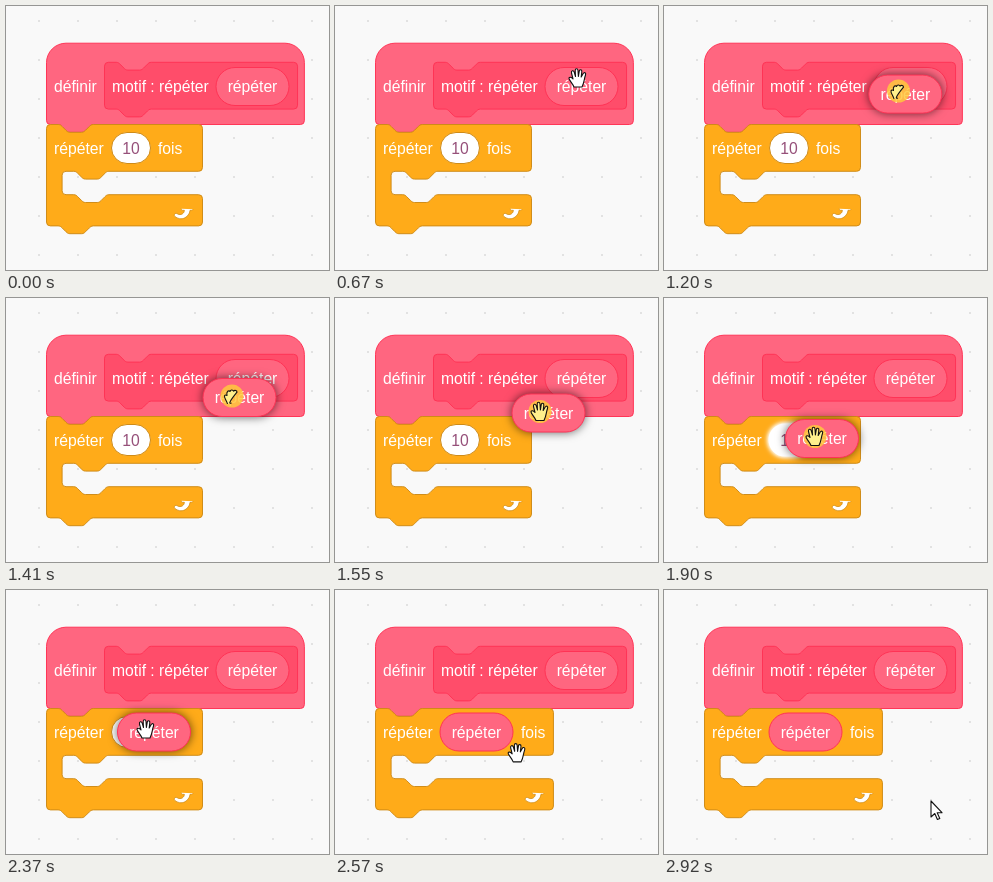
Write an HTML page that moves like this. It is 323x264 px and loops after 4110 ms.

```html
<!DOCTYPE html>
<html lang="fr">
<meta charset="utf-8">
<style>
html, body { margin: 0; width: 100%; height: 100%; overflow: hidden; background: #f9f9f9 }
svg { display: block; width: 323px; height: 264px }
text { font: 15.7px "Liberation Sans", Arial, sans-serif; fill: #fff }
.pink { fill: #ff6680; stroke: #ff3355 }
.rose { fill: #ff4d6a; stroke: #ff3355 }
.gold { fill: #ffab19; stroke: #cf8b17 }
.mid { text-anchor: middle }
#drag { filter: drop-shadow(0 0 5px rgba(0, 0, 0, .6)) }
#slot.glow { stroke: #fff; stroke-width: 2; filter: drop-shadow(0 0 2px #fff) drop-shadow(0 0 2px #fff) }
#cursor path { stroke: #111; stroke-width: 1.1; stroke-linejoin: round }
</style>
<body>
<script>
const LOOP = 4110, SCALE = .975;

// Connector notch drawn rightwards and leftwards
const R = 'c2 0 3 1 4 2l4 4c1 1 2 2 4 2h12c2 0 3-1 4-2l4-4c1-1 2-2 4-2';
const L = 'c-2 0-3 1-4 2l-4 4c-1 1-2 2-4 2h-12c-2 0-3-1-4-2l-4-4c-1-1-2-2-4-2';
const TOP = `M0 4a4 4 0 0 1 4-4h8${R}`;
const END = `a4 4 0 0 1-4 4H48${L}H4a4 4 0 0 1-4-4z`;

const hat = `M0 20a20 20 0 0 1 20-20h224.5a20 20 0 0 1 20 20v59.4${END}`;
const proto = `${TOP}H194a4 4 0 0 1 4 4v40${END}`;
const loopBlock = w => `${TOP}H${w - 4}a4 4 0 0 1 4 4v40a4 4 0 0 1-4 4H64${L}h-8` +
  `a4 4 0 0 0-4 4v16a4 4 0 0 0 4 4h8${R}H${w - 4}a4 4 0 0 1 4 4v24${END}`;
const turn = 'M23.3 11c-.3.6-.9 1-1.5 1h-1.6c-.1 1.3-.5 2.5-1.1 3.6-.9 1.7-2.3 3.2-4.1 4.1' +
  '-1.7.9-3.6 1.2-5.5.9-1.8-.3-3.5-1.1-4.9-2.3-.7-.7-.7-1.9 0-2.6.6-.6 1.6-.7 2.3-.2H7' +
  'c.9.6 1.9.9 2.9.9s1.9-.3 2.7-.9c1.1-.8 1.8-2.1 1.8-3.5h-1.5c-.9 0-1.7-.7-1.7-1.7' +
  '0-.4.2-.9.5-1.2l4.4-4.4c.7-.6 1.7-.6 2.4 0L23 9.2c.5.5.6 1.2.3 1.8z';

const shapes = {
  arrow: 'M0 0V16l3.8-3.5 2.6 6 2.4-1-2.6-5.8H11z',
  open: 'M-4 9C-5 6-9 2-9 .5-9-1.5-6.5-1-5 1L-6.5-5C-7-7.5-4.5-8-3.8-5.8L-2.5-1.5-2.8-7.5' +
    'C-2.8-9.8-.2-9.8 0-7.5L.4-1.5 1.3-7C1.7-9 4.1-8.5 3.8-6.3L3.2-1 5.2-4.5C6.3-6.3 8.3-5 7.5-3 6 1 6.5 4 4 9z',
  fist: 'M-4.5 8C-5 5-8 2-7.5 0-7-1.5-5.5-.8-5-.5-6-5-3-6-2-4.5-1.5-6.5 1-6.5 1.5-4.8 3-6.5 5-5 5-3.8' +
    '7-4.5 7.8-2.5 7.5-.5 7 4 6 4 5 8z'
};

const block = (x, y, d, cls, id = '') =>
  `<g transform="translate(${x} ${y}) scale(${SCALE})"><path id="${id}" class="${cls}" d="${d}"/></g>`;
const text = (x, y, s, extra = '') => `<text x="${x}" y="${y}" ${extra}>${s}</text>`;
const pill = (x, y, id = '') => `<g id="${id}" transform="translate(${x} ${y})">
  <rect class="pink" x="-36.5" y="-19" width="73" height="38" rx="19"/>${text(0, 5.6, 'répéter', 'class="mid"')}</g>`;

document.body.innerHTML = `<svg viewBox="0 0 323 264">
  <pattern id="grid" x="32" y="14" width="39" height="39" patternUnits="userSpaceOnUse">
    <rect width="2" height="2" fill="#e2e2e2"/></pattern>
  <rect width="323" height="264" fill="url(#grid)"/>
  ${block(40.5, 37.2, hat, 'pink')}
  ${block(98.5, 56.3, proto, 'rose')}
  ${text(48, 86, 'définir')}${text(106, 86, 'motif : répéter')}
  ${pill(246.5, 80.5)}
  ${block(40.5, 118.5, '', 'gold', 'loop')}
  ${text(48, 148, 'répéter')}${text(152, 148, 'fois', 'id="times"')}
  <g id="turn"><path d="${turn}" transform="scale(${SCALE})" fill="#fff" stroke="#cf8b17" stroke-width=".8"/></g>
  <g id="input"><rect id="slot" x="105.5" y="126.5" width="39" height="31" rx="15.5" fill="#fff" stroke="#cf8b17"/>
    ${text(125, 148, '10', 'class="mid" style="fill:#96507a"')}</g>
  ${pill(0, 0, 'drag')}
  ${pill(141.5, 142, 'placed')}
  <g id="cursor"><circle r="11.5" fill="#ffc93c" opacity=".85"/><path/></g>
</svg>`;

const $ = id => document.getElementById(id);
const show = (el, on) => el.setAttribute('visibility', on ? 'visible' : 'hidden');
const place = (el, [x, y]) => el.setAttribute('transform', `translate(${x} ${y})`);
const [halo, glyph] = $('cursor').children;

// Motion runs in short bursts of steps: start, end, step length
const bursts = [[0, 0, 1], [330, 670, 68], [930, 1410, 80], [1480, 1970, 70], [2370, 2850, 80], [2920, 2920, 1]];
function stepTime(t) {
  const [start, end, step] = bursts.filter(b => b[0] <= t).pop();
  return Math.min(end, start + Math.floor((t - start) / step) * step);
}

// Keys: time, x, y
const cursorPath = [[330, 295, 236], [670, 243, 72], [930, 243, 72], [1410, 226, 98], [1690, 184, 129],
  [1900, 151, 138.5], [1970, 140, 139], [2370, 140, 139], [2850, 266.5, 210.5], [2920, 267, 211]];
const dragPath = [[1010, 246.5, 80.5], [1410, 233.5, 99.5], [1690, 193.5, 130.5], [1900, 158, 140.5], [1970, 148, 142]];
function at(path, t) {
  const i = path.findIndex(k => k[0] > t);
  if (i < 1) return path.at(i).slice(1);
  const [a, b] = [path[i - 1], path[i]], p = (t - a[0]) / (b[0] - a[0]);
  return [1, 2].map(n => a[n] + (b[n] - a[n]) * p);
}

function draw(now) {
  const t = stepTime(now % LOOP);
  const snapped = t >= 2450, pressed = t >= 930 && t < 2370, width = snapped ? 182.5 : 160;
  $('loop').setAttribute('d', loopBlock(width));
  $('times').setAttribute('x', snapped ? 186 : 152);
  place($('turn'), [40.5 + (width - 33) * SCALE, 192.6]);
  show($('input'), !snapped);
  show($('placed'), snapped);
  show($('drag'), t >= 1010 && !snapped);
  place($('drag'), at(dragPath, t));
  $('slot').setAttribute('class', t >= 1760 && t < 2370 ? 'glow' : '');

  const [x, y] = at(cursorPath, t);
  const overBlock = y < 118 ? x < 298 : y < 220 && x < 40 + width * SCALE;
  show($('cursor'), t >= 330);
  place($('cursor'), [x, y]);
  halo.style.display = pressed ? '' : 'none';
  glyph.setAttribute('d', shapes[!overBlock ? 'arrow' : pressed && t < 1480 ? 'fist' : 'open']);
  glyph.setAttribute('fill', pressed ? '#fff08c' : '#fff');
}

const origin = performance.now();
(function frame() {
  draw(performance.now() - origin);
  requestAnimationFrame(frame);
})();
</script>
</body>
</html>
```
